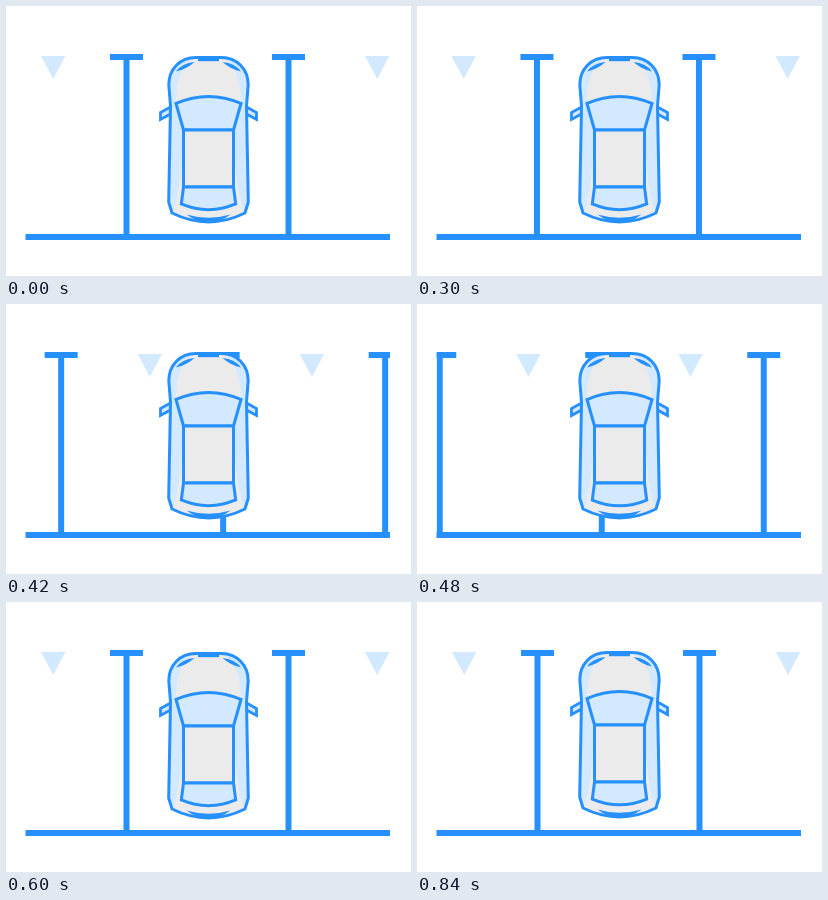
An HTML page for the animation above (0.9 s loop, 405 px wide and 270 px high).

```html
<!DOCTYPE html>
<html lang="en">
<head>
<meta charset="utf-8">
<title>Parking</title>
<style>
  html, body { margin: 0; width: 100%; height: 100%; overflow: hidden; background: #fff; }
  svg { display: block; width: 100vw; height: 100vh; }
  .line { fill: none; stroke: #2790ff; stroke-width: 3; }
  .ink { fill: #2790ff; }
  .pale { fill: #d2e9ff; }
  .grey { fill: #ebebeb; }
</style>
</head>
<body>
<svg viewBox="0 0 405 270">
  <defs>
    <clipPath id="lot"><rect x="19.5" y="40" width="364.5" height="200"/></clipPath>
    <g id="bay">
      <path class="ink" d="M104 48h33v6h-13.5v176h-6V54H104z"/>
      <path class="pale" d="M35 50h24.4L47.2 73z"/>
    </g>
    <g id="mirror">
      <path class="pale" d="M164.500 101L154.500 106.500V113.500L164.500 108z"/>
      <path class="line" style="stroke-width:2.800" d="M164.500 101L154.500 106.500V113.500L164.500 108"/>
    </g>
    <g id="flank">
      <path class="pale" d="M186 53C174 63 170 78 170 97L176.500 124C176.500 155 174 185 167 206L163 196L165 100L163 77C164 64 172 54 186 53z"/>
    </g>
    <path id="lamp" class="ink" d="M170 65.500Q176 57 188.500 56Q181 63 170 65.500z"/>
    <path id="body" d="M190 51.500H215C231 51.500 242.200 63 242.200 79L240.500 100L242.300 196L239 207Q202.500 225 166 207L162.700 196L164.500 100L162.800 79C162.800 63 174 51.500 190 51.500z"/>
  </defs>
  <g clip-path="url(#lot)"><g id="bays"></g></g>
  <rect class="ink" x="19.500" y="228" width="364.500" height="6"/>
  <g id="car">
    <use href="#mirror"/>
    <use href="#mirror" transform="matrix(-1 0 0 1 405 0)"/>
    <use href="#body" class="grey"/>
    <use href="#flank"/>
    <use href="#flank" transform="matrix(-1 0 0 1 405 0)"/>
    <use href="#lamp"/>
    <use href="#lamp" transform="matrix(-1 0 0 1 405 0)"/>
    <rect class="ink" x="192" y="50.500" width="21" height="4.700"/>
    <path class="ink" d="M180.500 208.500Q202.500 215 224.500 208.500Q215 216 202.500 216T180.500 208.500z"/>
    <use href="#body" class="line"/>
    <path class="line pale" style="fill:#d2e9ff" d="M170 97.500Q202.500 83.500 235 97.500L227.500 124H177.500z"/>
    <path class="line" style="fill:#ebebeb" d="M177.500 124H227.500V181H177.500z"/>
    <path class="line" style="fill:#d2e9ff" d="M177.500 181H227.500L229.700 198Q202.500 209.500 175.300 198z"/>
  </g>
</svg>
<script>
  const LOOP = 900, BEAT = 300, PITCH = 162, BOUNCE = 2.5;
  const bays = document.getElementById('bays');
  const car = document.getElementById('car');

  for (let i = -1; i < 4; i++) {
    const bay = document.createElementNS('http://www.w3.org/2000/svg', 'use');
    bay.setAttribute('href', '#bay');
    bay.setAttribute('x', i * PITCH);
    bays.append(bay);
  }

  function draw(ms) {
    const t = ms % LOOP;
    // The lot slides by one bay during the middle beat.
    const slide = Math.min(1, Math.max(0, t / BEAT - 1));
    const lift = 1 - Math.abs(1 - 2 * (t % BEAT) / BEAT);
    bays.setAttribute('transform', `translate(${-PITCH * slide} 0)`);
    car.setAttribute('transform', `translate(0 ${-BOUNCE * lift})`);
  }

  const start = performance.now();
  function tick() {
    draw(performance.now() - start);
    requestAnimationFrame(tick);
  }
  tick();
</script>
</body>
</html>
```
